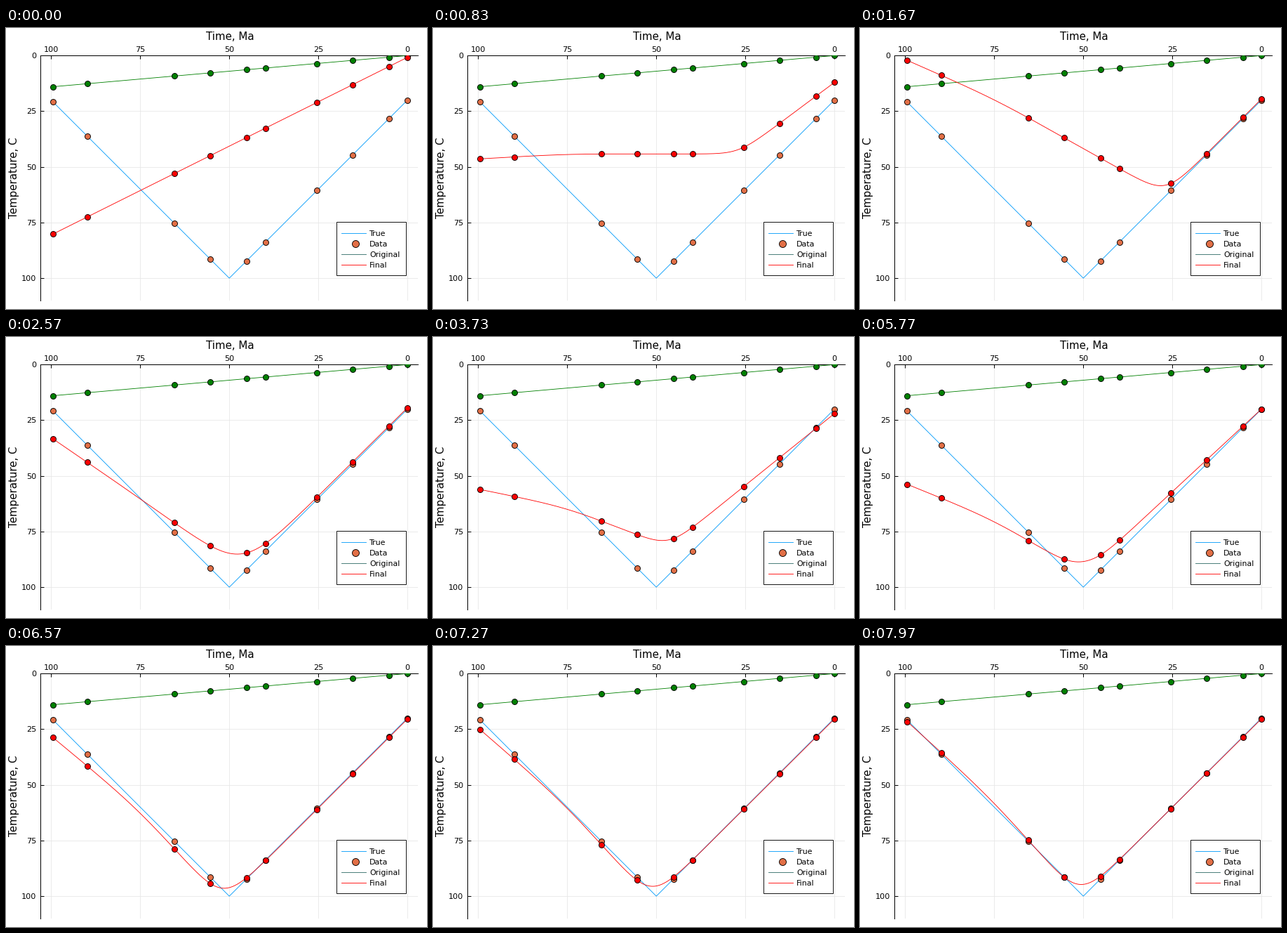
Write a matplotlib script that moves like this. It is 600 by 400 pixels and loops after 8 s.

```python
import numpy as np
import matplotlib.pyplot as plt
from matplotlib.animation import FuncAnimation
from matplotlib.patches import Rectangle

W, H, DPI = 600, 400, 100
FRAMES, LOOP = 240, 8000
PX = 72 / DPI  # points per pixel
LEFT, RIGHT, TOP, BOTTOM = 49.1, 587.4, 39.2, 387.8

BLUE, ORANGE, GREEN, RED = "#009afa", "#e26f46", "#008000", "#ff0000"

plt.rcParams["font.family"] = "DejaVu Sans"

TIMES = np.array([0, 5.2, 15.4, 25.4, 39.85, 45.2, 55.4, 65.45, 89.9, 99.45])
GRID = np.linspace(0, TIMES[-1], 400)

# Training stage: step -> start, slope, bend, bend time, roundness, late bend
STAGES = {
    0: (0.8, 0.798, 0, 26.9, 2.5, 0),
    50: (19.5, 1.6, -2.5, 26.9, 2.5, 0.2),
    77: (19.4, 1.585, -2.73, 46.4, 4.2, 0.05),
    111: (22, 1.29, -1.93, 46.6, 2.5, 0.32),
    149: (19.6, 1.37, -1.5, 45.45, 2.3, 0.16),
    197: (20.4, 1.6, -3.42, 51.8, 2.9, 0.5),
    239: (20.3, 1.59, -3.44, 51, 2.8, 0.4),
}
STEPS = list(STAGES)
CALM = 149  # step at which the fit stops swinging widely


def hinge(t, at, width):
    """Zero before the bend, slope one after it, rounded over the width."""
    return width * np.logaddexp(0, (t - at) / width)


def curve(t, stage):
    start, slope, bend, at, width, late = STAGES[stage]
    return start + slope * t + bend * hinge(t, at, width) + late * hinge(t, 75, 5)


def fit_at(t, step):
    s = min(np.searchsorted(STEPS, step, side="right") - 1, len(STEPS) - 2)
    a, b = STEPS[s], STEPS[s + 1]
    u = (step - a) / (b - a)
    base = (1 - u) * curve(t, a) + u * curve(t, b)
    size = 62 - 30 * step / CALM if step < CALM else 2
    cycles = round((b - a) / 18)
    return base + size * np.sin(2 * np.pi * cycles * u) ** 3 * (0.8 + t / 200)


def true_temp(t):
    return 100 - 1.6 * np.abs(t - 50)


def original(t):
    return 0.1408 * t


def dots(axes, x, y, color, z, size=8):
    return axes.plot(x, y, "o", ms=size * PX, mfc=color, mec="black",
                     mew=0.9 * PX, zorder=z)[0]


def line(axes, x, y, color, z):
    return axes.plot(x, y, color=color, lw=0.85 * PX, zorder=z)[0]


fig = plt.figure(figsize=(W / DPI, H / DPI), dpi=DPI, facecolor="white")
ax = fig.add_axes([LEFT / W, 1 - BOTTOM / H, (RIGHT - LEFT) / W, (BOTTOM - TOP) / H])
ax.set_xlim(103, -3)
ax.set_ylim(110, 0)
ax.set_xticks(range(0, 101, 25))
ax.set_yticks(range(0, 101, 25))
ax.set_axisbelow(True)
ax.grid(color="#e6e6e6", lw=0.8 * PX)
ax.xaxis.tick_top()
ax.tick_params(direction="in", length=5 * PX, width=PX, labelsize=11.3 * PX)
ax.tick_params(axis="x", pad=3.3 * PX)
ax.tick_params(axis="y", pad=5.6 * PX)
for side in ("left", "top"):
    ax.spines[side].set_linewidth(PX)
for side in ("right", "bottom"):
    ax.spines[side].set_visible(False)

bends = np.array([100, 50, 0])
line(ax, bends, true_temp(bends), BLUE, 2)
dots(ax, TIMES, true_temp(TIMES), ORANGE, 3)
line(ax, TIMES, original(TIMES), GREEN, 4)
dots(ax, TIMES, original(TIMES), GREEN, 5)
fit_line = line(ax, [], [], RED, 6)
fit_dots = dots(ax, [], [], RED, 7)

# Pixel-space layer for the titles and the legend
top = fig.add_axes([0, 0, 1, 1], zorder=5)
top.set_xlim(0, W)
top.set_ylim(H, 0)
top.axis("off")
top.text(319, 17, "Time, Ma", size=15 * PX, ha="center", va="baseline")
top.text(19, 213.5, "Temperature, C", size=15 * PX, rotation=90,
         ha="right", va="center")
top.add_patch(Rectangle((471, 276), 99, 75.5, fc="white", ec="black", lw=0.9 * PX))
for row, (name, color) in enumerate([("True", BLUE), ("Data", ORANGE),
                                     ("Original", "#2f6a66"), ("Final", RED)]):
    y = 291.8 + 15.1 * row
    if name == "Data":
        dots(top, [498], [y], color, 3, 10)
    else:
        line(top, [477.5, 513], [y, y], color, 3)
    top.text(518.3, y + 4.2, name, size=11 * PX, va="baseline")


def draw(step):
    fit_line.set_data(GRID, fit_at(GRID, step))
    fit_dots.set_data(TIMES, fit_at(TIMES, step))
    return fit_line, fit_dots


anim = FuncAnimation(fig, draw, frames=FRAMES, interval=LOOP / FRAMES,
                     repeat=True, repeat_delay=0, blit=False)
plt.show()
```
